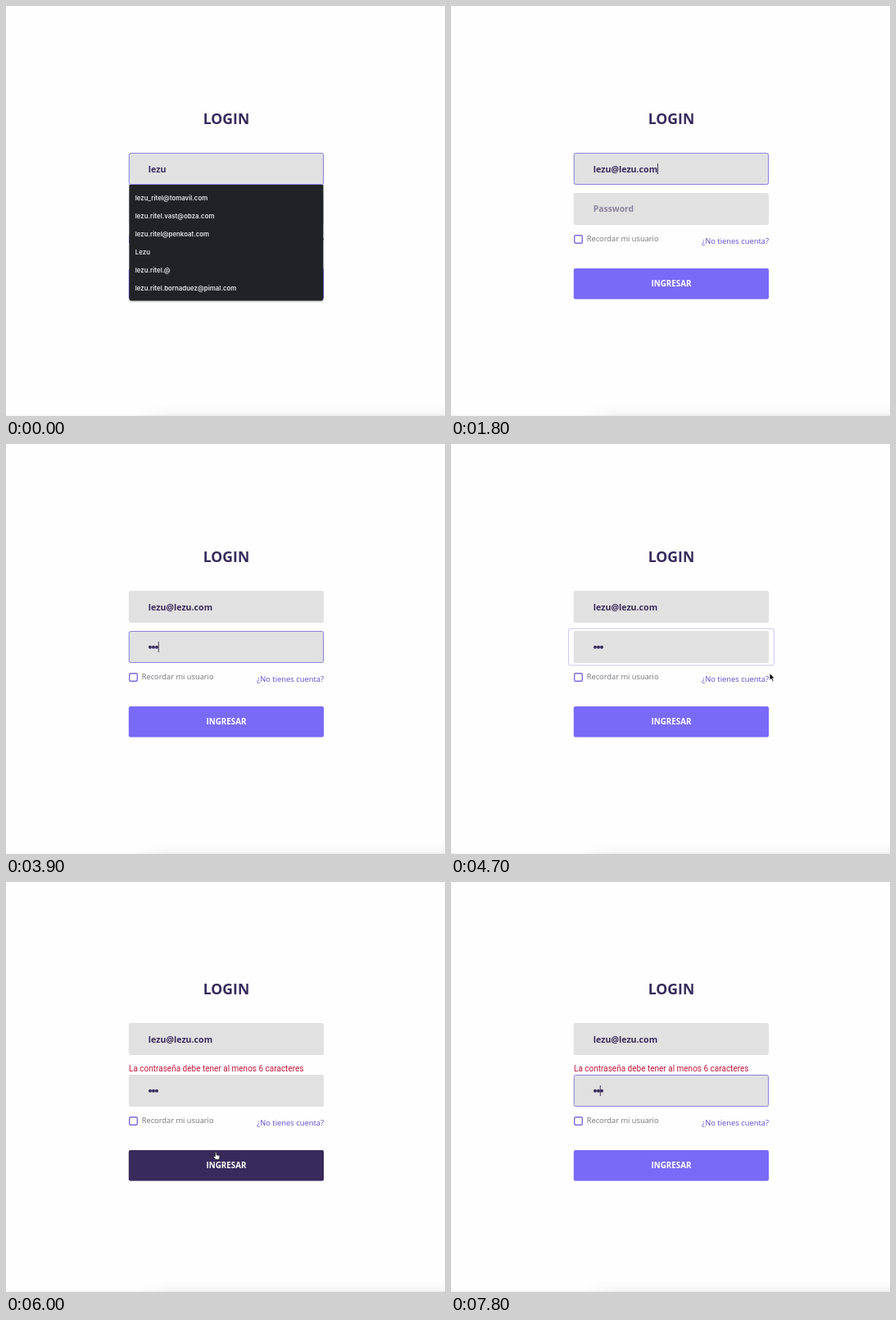
Animation, 536 px wide and 500 px high, one loop 8 s. Source, as an HTML page:

```html
<!DOCTYPE html>
<html lang="es">
<head>
<meta charset="utf-8">
<title>Login</title>
<style>
  html, body { margin: 0; width: 100%; height: 100%; overflow: hidden; background: #fefefe; }
  svg { display: block; width: 536px; height: 500px; }
  text { font-family: "Open Sans", "Noto Sans", sans-serif; white-space: pre; }
  .bold { font-weight: 700; fill: #372b5b; }
  .field { fill: #e1e1e1; }
  .ring { fill: none; stroke: #8b82de; }
  .caret { stroke: #48405c; }
  #menu text { font: 600 7.85px Inter, Roboto, sans-serif; fill: #e6e6e8; }
  #error { font: 10px Roboto, "Liberation Sans", sans-serif; fill: #c2183f; }
</style>
</head>
<body>
<svg viewBox="0 0 536 500">
  <defs>
    <linearGradient id="fade" x2="0" y2="1">
      <stop offset="0" stop-color="#000" stop-opacity="0"/>
      <stop offset="1" stop-color="#000" stop-opacity=".035"/>
    </linearGradient>
    <linearGradient id="side">
      <stop offset="0" stop-color="#fff" stop-opacity="0"/>
      <stop offset="1" stop-color="#fff"/>
    </linearGradient>
    <mask id="soft"><rect x="160" y="480" width="40" height="20" fill="url(#side)"/><rect x="200" y="480" width="336" height="20" fill="#fff"/></mask>
  </defs>
  <rect y="498.5" width="536" height="1.5" fill="#f5f5f5"/>
  <rect x="160" y="485" width="376" height="15" fill="url(#fade)" mask="url(#soft)"/>

  <g id="upper">
    <text class="bold" x="269" y="143.6" font-size="17.6" text-anchor="middle">LOGIN</text>
    <rect class="field" x="149.8" y="179" width="238.2" height="39" rx="2"/>
    <text class="bold" id="user" x="173.8" y="202.7" font-size="10.65"></text>
    <path class="caret" id="userCaret"/>
    <rect class="ring" id="userRing" rx="2"/>
  </g>

  <text id="error" x="150" y="231.4">La contraseña debe tener al menos 6 caracteres</text>

  <g id="lower">
    <rect class="field" x="149.8" y="228" width="238.2" height="39" rx="2"/>
    <text id="hint" x="173.8" y="251.3" font-size="10.35" font-weight="700" fill="#8b849c">Password</text>
    <g id="dots" fill="#372b5b">
      <circle cx="176" cy="247.7" r="2"/><circle cx="180" cy="247.7" r="2"/><circle cx="184" cy="247.7" r="2"/>
    </g>
    <path class="caret" id="passCaret"/>
    <rect class="ring" id="passRing" rx="2"/>
    <rect x="150.7" y="279.7" width="9.6" height="9.6" rx="1.5" fill="#fff" stroke="#7a6bdc" stroke-width="1.4"/>
    <text x="165.7" y="287.4" font-size="9.3" fill="#757479">Recordar mi usuario</text>
    <text x="388" y="290.2" font-size="9.4" font-weight="500" fill="#604bcb" text-anchor="end">¿No tienes cuenta?</text>
    <rect id="button" x="149.8" y="320" width="238.2" height="37.5" rx="2"/>
    <text x="269" y="342.4" font-size="9.8" font-weight="700" fill="#fff" text-anchor="middle">INGRESAR</text>
  </g>

  <g id="menu">
    <path d="M150 220H388V359q0 2.5 -3 2.5H153q-3 0 -3 -2.5Z" fill="#000" opacity=".12"/>
    <path d="M150.4 218H387.4V356.5q0 3 -3 3H153.4q-3 0 -3 -3Z" fill="#212226"/>
  </g>

  <g id="mouse" stroke-linejoin="round">
    <path id="beam" d="M-2.5 -5Q0 -5 0 -3.5Q0 -5 2.5 -5M0 -4V4M-2.5 5Q0 5 0 3.5Q0 5 2.5 5M-1 1.5H1" fill="none" stroke="#3c3c3c" stroke-width=".8"/>
    <path id="arrow" d="M0 0V8.6L2 6.8L3.5 10L5 9.4L3.6 6.2H6.2Z" fill="#000" stroke="#fff" stroke-width=".8"/>
    <path id="hand" d="M-1.6 -4.2Q-.6 -5.2 0 -4V-1.2L3 -.6Q4.2 -.3 4 1.2L3.2 4.6H-1L-3.6 1.2Q-3.4 -.2 -1.6 1Z" fill="#fff" stroke="#222" stroke-width=".8"/>
  </g>
</svg>
<script>
const LOOP = 8000, TICK = 100, SHIFT = 7, ERROR_AT = 5600;
const $ = id => document.getElementById(id);
const set = (id, attrs) => { for (const k in attrs) $(id).setAttribute(k, attrs[k]); };
const show = (id, on) => set(id, { visibility: on ? 'visible' : 'hidden' });
const clamp = v => Math.max(0, Math.min(1, v));
const mix = (a, b, p) => a + (b - a) * p;

const EMAIL = 'lezu@lezu.com';
const KEYS = [100, 1000, 1100, 1200, 1300, 1500, 1700, 1700, 1800];
const BLUR_USER = 2650, BLUR_PASS = 4535, REFOCUS = 6390;

// [time, x, y, shape]
const PATH = [
  [2200, 300, 200, 'beam'], [2600, 344, 250, 'beam'], [2900, 345, 253, 'beam'], [3100, 339, 249, 'beam'],
  [4200, 345, 252, 'beam'], [4400, 432, 288, 'arrow'], [4500, 434, 286, 'arrow'],
  [4700, 389, 279.5, 'arrow'], [4900, 338, 306, 'arrow'], [5000, 305, 326, 'hand'],
  [5300, 260, 338, 'hand'], [5600, 257, 334, 'hand'], [6000, 257, 334, 'hand'],
  [6100, 259, 318, 'arrow'], [6300, 270, 258, 'beam'], [6500, 272, 239.5, 'beam'],
  [6800, 290, 252, 'beam'], [7000, 300, 258, 'beam']
];

['lezu_ritel@tomavil.com', 'lezu.ritel.vast@obza.com', 'lezu.ritel@penkoat.com',
 'Lezu', 'lezu.ritel.@', 'lezu.ritel.bornaduez@pimal.com'].forEach((line, i) => {
  const row = document.createElementNS('http://www.w3.org/2000/svg', 'text');
  row.textContent = line;
  row.setAttribute('x', 157.8);
  row.setAttribute('y', 236.8 + i * 22);
  $('menu').append(row);
});

// The CSS "ease" curve
function ease(x) {
  x = clamp(x);
  let lo = 0, hi = 1, u = x;
  for (let i = 0; i < 20; i++) {
    u = (lo + hi) / 2;
    const bx = .75 * u * (1 - u) ** 2 + .75 * u * u * (1 - u) + u ** 3;
    if (bx < x) lo = u; else hi = u;
  }
  return .3 * u * (1 - u) ** 2 + 3 * u * u * (1 - u) + u ** 3;
}

const since = (t, start, length = 500) => ease((t - start) / length);

// focus 1: tight around the field; focus 0: spread out and gone
function ring(id, y, focus) {
  const off = 12 * (1 - focus);
  set(id, {
    x: 150.3 - off, y: y + .5 - off / 2, width: 237.2 + 2 * off, height: 38 + off,
    'stroke-opacity': focus
  });
}

function caret(id, x, y, on) {
  set(id, { d: `M${x} ${y}v13` });
  show(id, on);
}

function drawMouse(t) {
  const on = (t >= 2200 && t < 3700) || (t >= 4200 && t < 7500);
  let i = 0;
  while (i < PATH.length - 1 && t >= PATH[i + 1][0]) i++;
  const a = PATH[i], b = PATH[i + 1] || a;
  // the pointer rests while typing
  const p = b === a || (t >= 3100 && t < 4200) ? 0 : clamp((t - a[0]) / (b[0] - a[0]));
  set('mouse', { transform: `translate(${mix(a[1], b[1], p)} ${mix(a[2], b[2], p)})` });
  for (const shape of ['beam', 'arrow', 'hand']) show(shape, on && a[3] === shape);
}

function draw(t) {
  const failed = t >= ERROR_AT;
  set('upper', { transform: `translate(0 ${failed ? -SHIFT : 0})` });
  set('lower', { transform: `translate(0 ${failed ? SHIFT : 0})` });
  show('error', failed);

  set('menu', { opacity: clamp(1 - t / 300) });

  $('user').textContent = EMAIL.slice(0, 4 + KEYS.filter(k => t >= k).length);
  const end = Math.round(173.8 + $('user').getComputedTextLength()) + .5;
  caret('userCaret', end, 192, t >= 100 && t < BLUR_USER && !(t >= 800 && t < 1000));
  ring('userRing', 179, 1 - since(t, BLUR_USER));

  const typed = clamp((t - 3600) / 300) * 3;
  show('hint', typed < 1);
  [...$('dots').children].forEach((dot, i) =>
    dot.setAttribute('visibility', typed > i + .5 ? 'visible' : 'hidden'));

  const again = t >= REFOCUS;
  const step = again ? (t >= 7500) + (t >= 7800) : Math.round(typed);
  caret('passCaret', 174.3 + 4 * step, 241, (t >= BLUR_USER && t < BLUR_PASS) || again);
  ring('passRing', 228, again ? since(t, REFOCUS)
    : since(t, BLUR_USER) - since(t, BLUR_PASS));

  const hover = since(t, 5000, 300) - since(t, 6050, 300);
  const rgb = [[121, 56], [106, 42], [248, 91]].map(([a, b]) => Math.round(mix(a, b, hover)));
  set('button', { fill: `rgb(${rgb})` });

  drawMouse(t);
}

const start = performance.now();
function frame() {
  const t = (performance.now() - start) % LOOP;
  draw(Math.floor(t / TICK) * TICK);
  requestAnimationFrame(frame);
}
frame();
</script>
</body>
</html>
```
